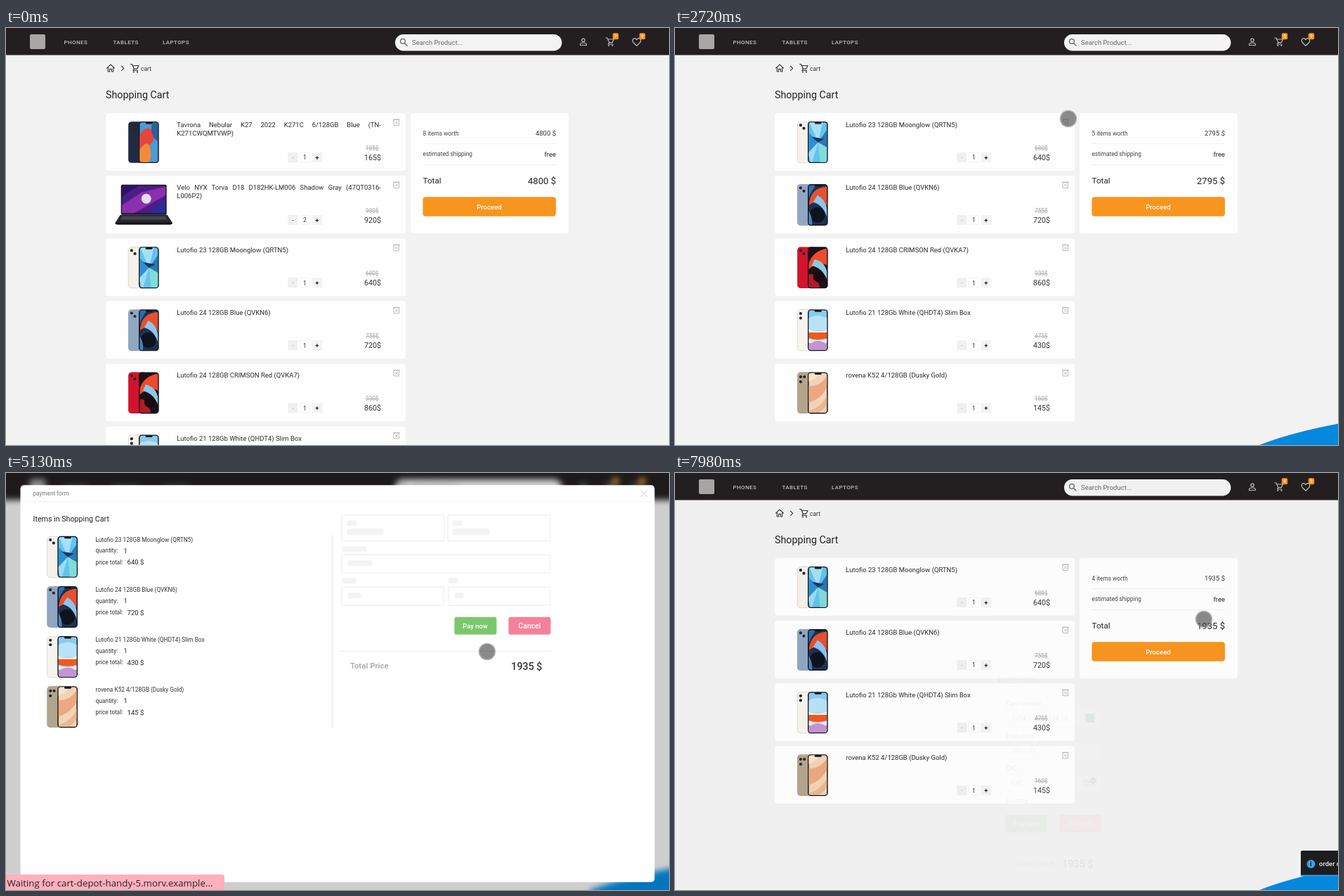
Recreate the animation shown at these times as an HTML page. Size 944 by 593 pixels, loop 8 s.

```html
<!DOCTYPE html>
<html lang="en">
<head>
<meta charset="utf-8">
<title>Shopping cart</title>
<style>
  html, body { margin: 0; width: 100%; height: 100%; overflow: hidden; background: #f2f2f2; }
  body > svg { display: block; width: 100vw; height: 100vh; font-family: Roboto, sans-serif; }
  .title { font-size: 9.5px; line-height: 11.5px; color: #2b2b2b; text-align: justify; }
  .form { font-family: "Open Sans", sans-serif; }
  .line { fill: none; stroke-linecap: round; stroke-linejoin: round; }
</style>
</head>
<body>
<script>
const LOOP = 8000, ROW = 89.1;
const ORANGE = '#f8951f', GREEN = '#43ac2e';

const prog = (t, start, len) => Math.min(1, Math.max(0, (t - start) / len));
const lerp = (a, b, k) => a + (b - a) * k;
const easeOut = (p, power) => 1 - (1 - p) ** power;
const within = (t, a, b) => t >= a && t < b;

const rect = (x, y, w, h, fill, r = 0, more = '') =>
  `<rect x="${x}" y="${y}" width="${w}" height="${h}" rx="${r}" fill="${fill}" ${more}/>`;
const circle = (x, y, r, fill, more = '') =>
  `<circle cx="${x}" cy="${y}" r="${r}" fill="${fill}" ${more}/>`;
const path = (d, fill) => `<path d="${d}" fill="${fill}"/>`;
const line = (d, color, width = 1) =>
  `<path class="line" d="${d}" stroke="${color}" stroke-width="${width}"/>`;
// y is the middle of the capitals
const text = (x, y, size, str, fill = '#333', more = '') =>
  `<text x="${x}" y="${y + size * .355}" font-size="${size}" fill="${fill}" ${more}>${str}</text>`;
const group = (x, y, body, more = '') => `<g transform="translate(${x} ${y})" ${more}>${body}</g>`;
const END = 'text-anchor="end"', MID = 'text-anchor="middle"', BOLD = 'font-weight="500"';

// ---- product pictures, 46 x 60 ----
function phone(back, lenses, art, backWidth = 26) {
  const cams = lenses.map(([x, y]) => circle(x, y, 2.1, '#26272c')).join('');
  return rect(1.5, .5, backWidth, 58.5, back, 4.5, 'stroke="#00000026" stroke-width=".8"') + cams +
    rect(16.3, .3, 28.7, 59, '#15161a', 4.5) +
    `<g clip-path="url(#screen)">${art}</g>` + rect(26, 1, 10, 2.8, '#15161a', 1.4);
}
const twoLenses = [[6.2, 5.5], [10.8, 10]];
const pics = {
  indigo: phone('#202b42', [[6, 6], [6, 12], [11, 7], [11, 12]],
    rect(16, 0, 30, 60, '#4b9bd6') +
    path('M16 24Q24 4 35 12T30 36T38 60H16Z', '#e4453c') +
    path('M16 42Q30 22 33 40T26 60H16Z', '#f28a3c') +
    path('M36 0Q30 20 45 30V0Z', '#2d5f9f')),
  laptop: rect(-9, 1, 65, 43, '#1a1624', 2) + rect(-7.5, 2.5, 62, 39, '#4b1d86') +
    path('M-7.5 30L20 12L54.5 4V16L10 41.5H-7.5Z', '#8a2fae') +
    path('M-7.5 2.5H16L-7.5 18Z', '#2b1466') + path('M30 41.5L54.5 22V41.5Z', '#2f2a9a') +
    circle(27, 21, 7, '#e6dcf2') +
    path('M-10 44H57L64 55Q64 58 60 58H-13Q-17 58 -17 55Z', '#26262c') +
    path('M-7 46H54L57 51H-10Z', '#45454e') + path('M-17 55H64V57H-17Z', '#111115'),
  cream: phone('#f6f1ea', twoLenses,
    rect(16, 0, 30, 60, '#62c3ef') + path('M31 30L16 14V46Z', '#2f8fd2') +
    path('M31 30L45 10V38Z', '#2a78b8') + path('M31 30L18 0H38Z', '#a6e0f7') +
    path('M31 30L45 38V60H34Z', '#7fdcd9') + path('M31 30L16 46L22 60Z', '#9adcf6') +
    path('M31 30L22 22L40 25Z', '#17395c')),
  blue: phone('#8fa7c3', twoLenses,
    rect(16, 0, 30, 60, '#20304f') + path('M18 30Q20 4 46 4V34Q34 18 18 30Z', '#e8502f') +
    path('M16 0H30Q20 10 16 26Z', '#2f6cae') + path('M30 16Q46 24 45 52Q40 30 24 26Z', '#8fc4ee') +
    circle(30, 44, 11, '#0e131d') + path('M16 36Q24 46 22 60H16Z', '#4b83bd')),
  red: phone('#d3132c', twoLenses,
    rect(16, 0, 30, 60, '#1d1016') + path('M16 34Q18 6 46 2V28Q32 18 16 34Z', '#ee4a2c') +
    path('M26 18Q46 22 45 50Q38 30 22 27Z', '#8cc9e4') +
    path('M16 40Q28 34 34 60H16Z', '#b51b25') + circle(32, 43, 8, '#160b10')),
  white: phone('#f7f4ee', [[6.2, 6], [6.2, 12.5]],
    rect(16, 0, 30, 60, '#8accf0') + path('M16 14Q30 4 46 14V30H16Z', '#b9e2f7') +
    path('M16 32H46V40Q31 46 16 40Z', '#ef5a1c') + path('M16 28Q31 34 46 28V33H16Z', '#f2efe8') +
    path('M16 41Q31 47 46 41V48H16Z', '#f1e6ea') + path('M16 52Q31 38 46 52V60H16Z', '#c593d2')),
  gold: phone('#b3a58b', [[6.2, 7], [6.2, 14], [11.5, 7]],
    rect(16, 0, 30, 60, '#f4d3b4') + path('M16 20Q34 22 45 4V18Q38 38 16 44Z', '#eba981') +
    path('M16 56Q38 50 46 28V40Q42 54 28 60H16Z', '#e9b792') +
    path('M16 0H34Q28 12 16 14Z', '#f8e3cc'))
};

// ---- data ----
const item = (name, old, price, pic, gone = Infinity, qty = 1) => ({ name, old, price, pic, gone, qty });
const items = [
  item('Tavrona Nebular K27 2022 K271C 6/128GB Blue (TN-K271CWQMTVWP)', 185, 165, 'indigo', 1410),
  item('Velo NYX Torva D18 D182HK-LM006 Shadow Gray (47QT0316-L006P2)', 980, 920, 'laptop', 2210, 2),
  item('Lutofio 23 128GB Moonglow (QRTN5)', 680, 640, 'cream'),
  item('Lutofio 24 128GB Blue (QVKN6)', 755, 720, 'blue'),
  item('Lutofio 24 128GB CRIMSON Red (QVKA7)', 930, 860, 'red', 3220),
  item('Lutofio 21 128Gb White (QHDT4) Slim Box', 475, 430, 'white'),
  item('rovena K52 4/128GB (Dusky Gold)', 160, 145, 'gold')
];
const kept = items.filter(i => i.gone === Infinity);

// ---- shop page ----
const cartIcon = (x, y, c) => group(x, y,
  line('M-5.5 -5H-3.6L-.6 1.6H3.8L6 -3H-2.6M-.6 1.6L-2 4H4.6', c, 1.2) +
  circle(-1.2, 6, 1.1, c) + circle(4, 6, 1.1, c));

const badge = (x, n, id) => rect(x - 4.2, 7.2, 8.4, 9, ORANGE, 2) +
  text(x, 11.8, 7, n, '#fff', `${MID} id="${id}"`);

const header = rect(-20, -20, 984, 58.5, '#231f20') + rect(34, 9, 22, 21, '#a9a6a6', 2) +
  [['PHONES', 82.5], ['TABLETS', 152.5], ['LAPTOPS', 223]].map(([s, x]) =>
    text(x, 20.3, 8, s, '#bdbbbb', `${BOLD} letter-spacing=".4"`)).join('') +
  rect(554, 9, 237.5, 23.5, '#f3f3f3', 11.7) +
  circle(565, 19, 3.4, 'none', 'stroke="#666" stroke-width="1.3"') + line('M567.7 21.7L571 25', '#666', 1.4) +
  text(578, 20.8, 9.5, 'Search Product...', '#666') +
  circle(822, 17.3, 2.2, 'none', 'stroke="#bbb" stroke-width="1.2"') +
  line('M817.6 24.5V23Q818 21 822 21T826.4 23V24.5Z', '#bbb', 1.2) +
  cartIcon(859.5, 19, '#bbb') +
  line('M898 25.2L893.6 21Q890.8 17.6 893.4 15.2Q896 13.8 898 16.6Q900 13.8 902.6 15.2Q905.2 17.6 902.4 21Z', '#bbb', 1.2) +
  badge(868, 7, 'count') + badge(906, 9, 'liked');

const crumbs = line('M143.5 57.2L149 52L154.5 57.2M145.3 56V62H147.6V58.4H150.4V62H152.7V56', '#333', 1.1) +
  line('M164.6 54.2L167.6 57.3L164.6 60.4', '#333', 1.2) + cartIcon(183, 56.5, '#333') +
  text(192, 58.3, 8.5, 'cart') + text(142, 94.5, 14.3, 'Shopping Cart', '#222');

const stepper = qty => rect(259.5, 56, 14, 14, '#f0f0f0', 1) +
  rect(276.5, 56.5, 14, 13, '#fff', 1, 'stroke="#f4f4f4"') + rect(293.5, 56, 15, 14, '#f3f3f3', 1) +
  text(266.5, 63, 9, '-', qty > 1 ? '#222' : '#aaa', MID) + text(283.5, 63.2, 8.8, qty, '#333', MID) +
  text(301, 63.2, 9.5, '+', '#111', `${MID} ${BOLD}`);

const card = it => rect(0, 0, 427, 82, '#fefefe', 4) + group(30.7, 11.7, pics[it.pic]) +
  `<foreignObject x="101.3" y="11" width="290.7" height="26"><div class="title">${it.name}</div></foreignObject>` +
  line('M410.5 9.5H417.5V17.5H410.5ZM409.5 9H418.5M412.3 11.8L415.7 15.2M415.7 11.8L412.3 15.2', '#b5b5b5', .9) +
  stepper(it.qty) +
  text(388.5, 49.8, 8.2, it.old + '$', '#a5a5a5', `${END} text-decoration="line-through"`) +
  text(392, 63, 10.7, it.price + '$', '#333', END);

const summary = rect(576, 121, 225, 171, '#fefefe', 4) +
  text(593.5, 149.6, 8.4, '', '#444', 'id="units"') + text(783, 149.8, 9.5, '', '#333', `${END} id="worth"`) +
  text(593.5, 179, 8.3, 'estimated shipping', '#444') + text(783, 179.3, 9.5, 'free', '#222', END) +
  line('M594 164.5H783M594 194.5H783', '#f1f1f1') +
  text(593.5, 217.3, 11.7, 'Total', '#222') + text(783, 217.3, 13.1, '', '#222', `${END} id="total"`) +
  rect(593.5, 240.3, 189.5, 27.5, ORANGE, 4) +
  rect(593.5, 240.3, 189.5, 27.5, GREEN, 4, 'id="hover"') +
  text(688, 254.3, 9.6, 'Proceed', '#fff', `${MID} ${BOLD}`);

// ---- payment dialog ----
const basket = text(18, 48, 10.7, 'Items in Shopping Cart', '#222') + kept.map((it, i) =>
  group(0, 71.1 * i, group(36.5, 72.3, pics[it.pic]) + text(107, 77.8, 8.3, it.name) +
    text(107, 93.3, 8.3, 'quantity:') + text(147, 93, 9.5, 1) +
    text(107, 110, 8.3, 'price total:') + text(152, 109.8, 9.6, it.price + ' $', '#222'))).join('');

const field = (x, y, w, h) => rect(x + .5, y + .5, w - 1, h - 1, '#fff', 2.5, 'stroke="#e9e9e9"');
const bar = (x, y, w, h = 8) => rect(x, y, w, h, '#f3f3f3', 3);

const skeleton = field(0, 42, 147, 38) + field(151, 42, 147, 38) + field(0, 98.5, 298, 27) +
  field(0, 144.5, 146, 27) + field(152, 144.5, 146, 27) +
  bar(8, 50, 14) + bar(8, 62, 52, 9) + bar(158, 50, 14) + bar(158, 62, 53, 9) +
  bar(1, 87, 35) + bar(9, 107, 35) + bar(1, 132, 20) + bar(152, 132, 14) + bar(9, 153, 19) + bar(161, 153, 13);

function form(w, stacked, cycle) {
  const label = (x, y, s) => text(x, y, 8.1, s, '#30313d');
  const hint = (x, y, s, c = '#757680') => text(x, y, 9.1, s, c);
  const brands = ['#1a4b9c', '#e8542a', '#1f72cd', ['#f27a1a', '#2567a8', '#0b7069'][cycle]];
  const marks = (stacked ? brands.slice(3) : brands)
    .map((c, i, all) => rect(w - 23 - 20.3 * (all.length - 1 - i), 61.5, 13, 13, c, 2)).join('');
  const half = stacked ? w : w / 2 - 3, cvcX = stacked ? 0 : half + 6, drop = stacked ? 46 : 0;
  return label(.5, 47.6, 'Card number') + field(0, 55, w, 26) +
    hint(8, 68.2, stacked ? '1234 1234 1234 12' : '1234 1234 1234 1234') + marks +
    label(.5, 93.3, 'Expiration') + field(0, 100.7, half, 26.5) + hint(8, 114.3, 'MM / YY') +
    group(cvcX, drop, label(.5, 93.3, 'CVC') + field(0, 100.7, half, 26.5) + hint(8, 114.3, 'CVC')) +
    group(w, drop, rect(-26, 108, 17, 11, '#d5d6da', 1.5) + rect(-26, 110.5, 17, 2.5, '#a4a6ad') +
      circle(-12, 111, 4.5, '#3c3e47') + text(-12, 111, 4, '123', '#fff', MID)) +
    label(.5, 139.3 + drop, 'Country') + (stacked ? '' : field(0, 146.3, w, 26.5) +
      hint(8, 160, 'Ukraine', '#30313d') + line(`M${w - 15} 158.3L${w - 11.7} 161.6L${w - 8.4} 158.3`, '#555'));
}

function payment(w, y, busy, hot, angle) {
  return group(0, y, rect(w - 137, -12.5, 60, 25, '#7bc86c', 3) +
    text(w - 107.5, .2, 9.4, 'Pay now', '#fff', `${MID} ${BOLD}`) +
    rect(w - 60, -12.5, 60, 25, hot ? '#f0436c' : '#f4819a', 3) +
    (busy ? `<g transform="translate(${w - 30.5} .5) rotate(${angle})">${line('M0 -6A6 6 0 1 0 6 0', '#ffffffcc', 1.5)}</g>`
          : text(w - 30, .2, 10.4, 'Cancel', '#fff', `${MID} ${BOLD}`)) +
    line(`M0 36.5H${w}`, '#e9e9e9') + text(12.5, 56.3, 11.5, 'Total Price', '#a6a6a6', BOLD) +
    text(w - 12, 57.3, 14.3, '1935 $', '#333', `${END} ${BOLD}`));
}

const toast = rect(0, 537, 230, 36, '#1d1d1f', 2) + rect(0, 571.5, 230, 2, '#2f9be8') +
  circle(14.5, 556, 6, '#38a0ea') + text(14.5, 556, 8.5, 'i', '#111', `${MID} font-weight="700"`) +
  text(26, 556, 9.5, 'order canceled', '#eee', BOLD);

const status = rect(-4, 571, 315, 30, '#ffb0bd', 3) +
  text(1.5, 583.3, 13.3, 'Waiting for cart-depot-handy-5.morv.example...', '#2a2226', 'class="form"');

document.body.insertAdjacentHTML('afterbegin', `<svg viewBox="0 0 944 593" preserveAspectRatio="none">
  <defs>
    <clipPath id="screen"><rect x="17.8" y="1.6" width="25.7" height="56.4" rx="3.2"/></clipPath>
    <radialGradient id="dark"><stop offset=".3" stop-opacity=".72"/><stop offset=".65" stop-opacity=".5"/><stop offset="1" stop-opacity="0"/></radialGradient>
  </defs>
  ${rect(0, 0, 944, 593, '#f2f2f2')}
  <g id="page">
    ${items.map((it, i) => `<g id="card${i}">${card(it)}</g>`).join('')}
    ${summary}${crumbs}${header}
    <g id="wave">${path('M831 593.5Q880 573.5 970 558V620H831Z', '#0489df')}</g>
  </g>
  ${rect(0, 0, 944, 593, '#000', 0, 'id="shade"')}
  <g id="dialog">
    <rect id="sheet" fill="#fff" rx="5"/>
    <g id="head">${text(18, 12.3, 8.2, 'payment form', '#777')}</g>
    <g id="close">${line('M-19.5 7.5L-10.5 16.5M-10.5 7.5L-19.5 16.5', '#c9c9c9')}</g>
    <svg id="left" overflow="hidden">${basket}<line x1="100%" x2="100%" y1="71" y2="346" stroke="#eee" stroke-width="4"/></svg>
    <path id="rule" stroke="#f0f0f0"/>
    <g id="right"></g>
  </g>
  <g id="status">${status}</g>
  <g id="toast">${toast}</g>
  <g id="cursor"><g id="idle">${circle(0, 0, 11, '#4b4b4ba6', 'stroke="#8f8f8f99" stroke-width="2.6"')}</g>
    <g id="pressed">${circle(0, 0, 13, 'url(#dark)')}</g></g>
</svg>`);

const el = {};
document.querySelectorAll('[id]').forEach(n => el[n.id] = n);
const set = (node, attrs) => { for (const k in attrs) node.setAttribute(k, attrs[k]); };
const move = (node, x, y) => node.setAttribute('transform', `translate(${x} ${y})`);
const show = (node, on) => node.setAttribute('opacity', +on);

// ---- cursor: time, x, y ----
const track = [
  [600, 390, 412], [860, 640, 300], [1200, 560, 129], [3020, 560, 129], [3190, 560, 313],
  [3620, 560, 313], [3720, 577, 313], [3760, 577, 313], [3930, 685, 254], [5840, 685, 254],
  [6080, 774, 190], [6540, 534, 150], [6650, 534, 150], [7340, 753, 208]
];
const presses = [[1410, 1610], [2210, 2410], [3220, 3420], [4420, 4790], [7470, 7790]];

function cursorAt(t) {
  const n = track.findIndex(k => k[0] > t);
  if (n < 0) return track.at(-1).slice(1);
  const b = track[n], a = track[Math.max(0, n - 1)];
  const p = b === a ? 0 : prog(t, a[0], b[0] - a[0]), k = p * p * (3 - 2 * p);
  return [lerp(a[1], b[1], k), lerp(a[2], b[2], k)];
}

function drawPage(t) {
  let y = 121;
  items.forEach((it, i) => {
    const fade = prog(t, it.gone, 300);
    move(el['card' + i], 142 - 100 * fade, y);
    show(el['card' + i], 1 - fade);
    y += ROW * (1 - easeOut(prog(t, it.gone, 500), 2.4));
  });
  const live = items.filter(it => t < it.gone + 490);
  const sum = live.reduce((s, it) => s + it.price * it.qty, 0) + ' $';
  el.count.textContent = live.length;
  el.units.textContent = live.reduce((s, it) => s + it.qty, 0) + ' items worth';
  el.worth.textContent = el.total.textContent = sum;
  move(el.wave, 0, 40 * (1 - easeOut(prog(t, 2210, 500), 2.4)));
  show(el.hover, t < 6000 ? prog(t, 4200, 200) : 0);
}

function drawDialog(t) {
  const closing = t > 7770;
  const s = closing ? (1 - prog(t, 7770, 253)) ** 1.5 : easeOut(prog(t, 4690, 340), 1.5);
  show(el.shade, .14 * s);
  el.page.style.filter = s > .2 ? `blur(${4 * s}px)` : 'none';
  show(el.dialog, s);
  if (!s) return;

  const w = 903 * s, h = 564.5 * s, x = 472 - w / 2, y = 299.5 - h / 2;
  const k = prog(s, .13, .87), colX = lerp(30, 457, k), colW = lerp(136, 298, k);
  const stacked = closing && colW < 240, loaded = prog(t, 5900, 300);
  const payY = stacked ? 218 : t < 5500 ? lerp(60, 200, prog(t, 4850, 180)) : lerp(200, 194, loaded);
  set(el.sheet, { x, y, width: w, height: h });
  set(el.left, { x, y, width: Math.max(0, colX - 12), height: h });
  set(el.rule, { d: `M${x} ${y + 23.5}h${w}` });
  move(el.head, x, y);
  move(el.close, x + w, y);
  move(el.right, x + colX, y);
  el.right.innerHTML =
    (loaded < 1 ? `<g opacity="${prog(t, 4980, 120) * (1 - loaded)}">${skeleton}</g>` : '') +
    (loaded > 0 ? `<g class="form" opacity="${loaded}">${form(colW, stacked, t < 6700 ? 0 : t < 7300 ? 1 : 2)}</g>` : '') +
    payment(colW, payY, within(t, 7550, 7770), within(t, 7290, 7830), t * .6);
}

function draw(t) {
  drawPage(t);
  drawDialog(t);
  show(el.status, within(t, 4600, 5900));
  move(el.toast, 944 - 53 * prog(t, 7880, 100), 0);
  const down = presses.some(([a, b]) => within(t, a, b));
  move(el.cursor, ...cursorAt(t));
  show(el.cursor, t >= 600);
  show(el.idle, !down);
  show(el.pressed, down);
}

const born = performance.now();
function tick() {
  draw((performance.now() - born) % LOOP);
  requestAnimationFrame(tick);
}
tick();
</script>
</body>
</html>
```
